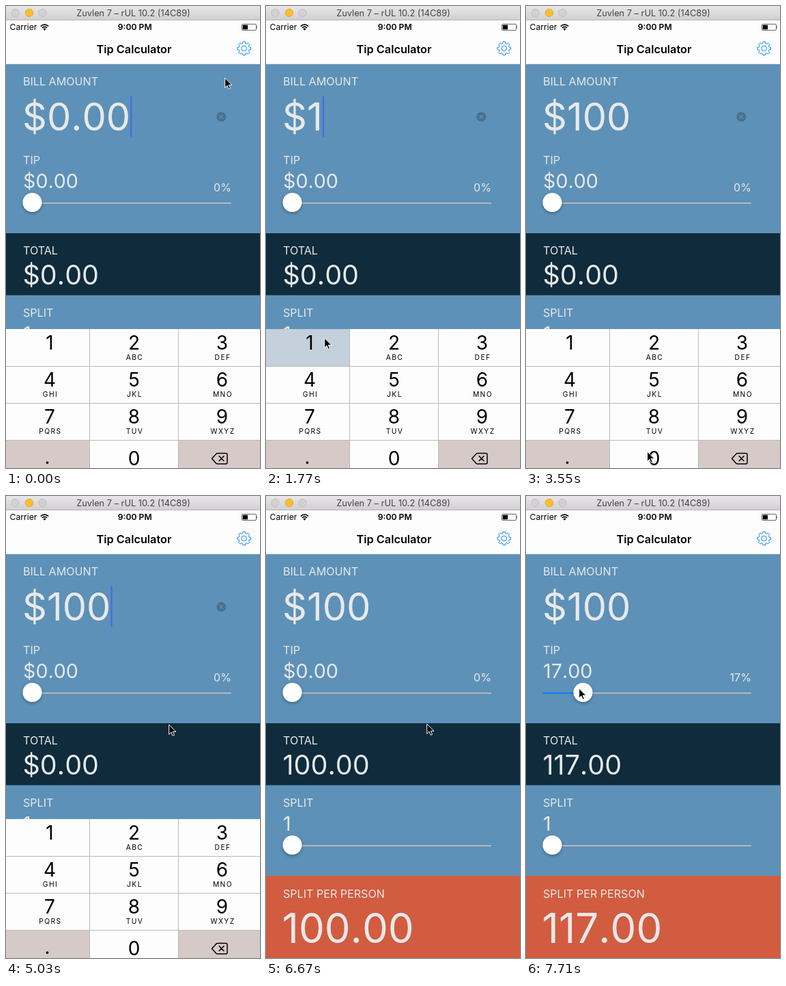
These frames come from a looping animation (372x675 px, 8000 ms). An HTML page:

```html
<!DOCTYPE html>
<html lang="en">
<head>
<meta charset="utf-8">
<title>Tip Calculator</title>
<style>
html, body { margin: 0; width: 100%; height: 100%; overflow: hidden; background: #fdfdfd; }
svg { display: block; width: 372px; height: 675px; font-family: Inter, Roboto, sans-serif; }
.mid { text-anchor: middle; }
.form text { fill: #e8e9ea; font-kerning: none; }
.form .label text { font-size: 16.1px; font-kerning: auto; }
.small { font-size: 28.7px; }
.total { font-size: 39.5px; }
.bill { font-size: 56px; }
.share { font-size: 60px; }
.digit { font-size: 28px; }
.letters { font-size: 10.3px; letter-spacing: 1.4px; }
.thumb { fill: #fff; filter: drop-shadow(0 2px 2px rgba(0, 0, 0, .3)); }
</style>
</head>
<body>
<svg viewBox="0 0 372 675">
  <defs>
    <linearGradient id="chrome" x2="0" y2="1">
      <stop stop-color="#e8e6e8"/><stop offset="1" stop-color="#d1cfd1"/>
    </linearGradient>
  </defs>

  <rect width="372" height="675" fill="#fdfdfd"/>
  <rect width="372" height="20.5" fill="url(#chrome)"/>
  <path d="M0 20.5H372" stroke="#b9b7b9"/>
  <g stroke-width=".8">
    <circle cx="13.5" cy="10" r="5.7" fill="#d2d0d2" stroke="#bcbabc"/>
    <circle cx="34" cy="10" r="5.7" fill="#fdbe2e" stroke="#dfa023"/>
    <circle cx="53.5" cy="10" r="5.7" fill="#d2d0d2" stroke="#bcbabc"/>
  </g>
  <text class="mid" x="186.5" y="15" font-size="12.8" fill="#444">Zuvlen 7 – rUL 10.2 (14C89)</text>

  <text x="5.5" y="35" font-size="12.2">Carrier</text>
  <path d="M50.8 29.6Q56.5 24.6 62.2 29.6M52.9 31.9Q56.5 28.8 60.1 31.9" fill="none" stroke="#000" stroke-width="1.7"/>
  <path d="M54.3 33.3Q56.5 31.6 58.7 33.3L56.5 35.8z"/>
  <text class="mid" x="188.7" y="35" font-size="12.2" font-weight="600">9:00 PM</text>
  <rect x="345.5" y="26.5" width="21" height="9" rx="1.5" fill="none" stroke="#555" stroke-width=".9"/>
  <path d="M346.7 27.7h7.3v6.6h-7.3zM367.4 29.4q1.6 1.6 0 3.2z"/>

  <text class="mid" x="187.5" y="69" font-size="16.3" font-weight="600">Tip Calculator</text>
  <g transform="translate(348.7 62)" fill="none" stroke="#1583f2">
    <path id="gear" stroke-linejoin="round"/><circle r="3.8"/>
  </g>

  <g class="form">
    <rect y="85" width="372" height="471" fill="#5d91b8"/>
    <path d="M0 85.3H372" stroke="#7f99aa" stroke-width=".8"/>
    <rect y="332" width="372" height="90.5" fill="#102b3b"/>
    <rect y="555" width="372" height="120" fill="#d25c3f"/>
    <g class="label">
      <text x="25" y="116">BILL AMOUNT</text>
      <text x="25" y="230.5">TIP</text>
      <text x="25" y="363">TOTAL</text>
      <text x="25" y="453.5">SPLIT</text>
      <text x="25" y="586.5">SPLIT PER PERSON</text>
      <text id="percent" x="330" y="270.7" text-anchor="end"></text>
    </g>
    <text id="bill" class="bill" x="24" y="182"></text>
    <text id="tip" class="small" x="25" y="266"></text>
    <text id="total" class="total" x="24.5" y="407"></text>
    <text class="small" x="25" y="489">1</text>
    <text id="share" class="share" x="23.5" y="653"></text>
    <path d="M25 288H330M25 511H330" stroke="#b5b7b9" stroke-width="2"/>
    <path id="filled" stroke="#0b7bff" stroke-width="2"/>
    <circle id="thumb" class="thumb" cy="287" r="14"/>
    <circle class="thumb" cx="38.5" cy="510" r="14"/>
  </g>

  <g id="editing">
    <circle cx="315.3" cy="162" r="7" fill="#48718f"/>
    <path d="M312.7 159.4l5.2 5.2m0-5.2l-5.2 5.2" stroke="#6796b8" stroke-width="1.1"/>
    <rect id="caret" y="132" width="2.3" height="59.3" fill="#466ce6"/>
    <rect y="472" width="372" height="203" fill="#fdfdfd"/>
    <path d="M0 635H122V675H0zM253 635H372V675H253z" fill="#d6cac9"/>
    <rect id="key1" y="472" width="122" height="54" fill="#c4d0dc"/>
    <rect id="key0" x="123" y="635" width="129" height="40" fill="#d6cac9"/>
    <path d="M0 526.5H372M0 580.5H372M0 634.5H372M122.5 472V675M252.5 472V675" stroke="#b4b2b2" stroke-width=".9"/>
    <g id="keys" class="mid"></g>
    <path d="M301.5 661.3L308 654.2Q308.6 653.6 309.5 653.6H322Q324 653.6 324 655.6V667Q324 669 322 669H309.5Q308.6 669 308 668.4zM311.8 657.3l7.6 7.8m0-7.8l-7.6 7.8"
      fill="none" stroke="#000" stroke-width="1.5" stroke-linejoin="round"/>
  </g>

  <path id="pointer" d="M.7 1.2V15.4L4 12.2L6.2 17.3L8.5 16.3L6.3 11.4H11z" stroke="#fff"/>
</svg>

<script>
const $ = id => document.getElementById(id);
const set = (id, attrs) => {
  for (const name in attrs) $(id).setAttribute(name, attrs[name]);
};
const show = (id, visible) => set(id, { display: visible ? 'inline' : 'none' });

const LOOP = 8000, STEP = LOOP / 54;
const KEYBOARD_CLOSES = 5470;
const TYPE_DELAY = 140;
const DRAG_STARTS = 7255, GRAB_X = 32, PIXELS_PER_PERCENT = 2.65;

const pointerStart = { x: 320, y: 104 };
const moves = [
  { from: 0, to: 1180, x: 62, y: 424 },
  { from: 1180, to: 1480, x: 85, y: 484 },
  { from: 1920, to: 2370, x: 177, y: 650 },
  { from: 4140, to: 5030, x: 238, y: 333 },
  { from: 6620, to: DRAG_STARTS, x: GRAB_X, y: 280 },
  { from: DRAG_STARTS, to: 7700, x: 77, y: 280 }
];
const taps = [
  { key: '1', down: 1620, up: 1900 },
  { key: '0', down: 2500, up: 2640 },
  { key: '0', down: 2650, up: 2790 }
];

function pointerAt(t) {
  let { x, y } = pointerStart;
  for (const move of moves) {
    const p = Math.min(1, Math.max(0, (t - move.from) / (move.to - move.from)));
    const eased = p * p * (3 - 2 * p);
    x += (move.x - x) * eased;
    y += (move.y - y) * eased;
  }
  return { x, y };
}

function buildKeys() {
  const letters = ['', 'ABC', 'DEF', 'GHI', 'JKL', 'MNO', 'PQRS', 'TUV', 'WXYZ'];
  const columns = [64, 187.5, 316.5];
  const digit = (x, y, text) => `<text class="digit" x="${x}" y="${y}">${text}</text>`;
  $('keys').innerHTML = letters.map((word, i) => {
    const x = columns[i % 3], y = 502 + 54 * Math.floor(i / 3);
    return digit(x, y, i + 1) + `<text class="letters" x="${x + 1}" y="${y + 15}">${word}</text>`;
  }).join('') + digit(60.5, 669, '.') + digit(187.5, 671, '0');
}

function buildGear() {
  const corners = Array.from({ length: 32 }, (_, i) => {
    const outer = i % 4 === 1 || i % 4 === 2;
    const side = i % 4 < 2 ? -1 : 1;
    const angle = Math.floor(i / 4) * Math.PI / 4 + side * (outer ? .17 : .27);
    const r = outer ? 9.9 : 7.6;
    return `${r * Math.cos(angle)} ${r * Math.sin(angle)}`;
  });
  set('gear', { d: `M${corners.join('L')}z` });
}

function drawEditing(t) {
  const typed = taps.filter(tap => t >= tap.down + TYPE_DELAY);
  $('bill').textContent = '$' + (typed.map(tap => tap.key).join('') || '0.00');

  // The caret stays solid for a moment after each typed digit, then blinks.
  const justTyped = typed.length && t - typed.at(-1).down - TYPE_DELAY < 700;
  const blinkedOff = t % 1000 >= 500 && t % 1000 < 800;
  show('caret', justTyped || !blinkedOff);
  set('caret', { x: 24 + $('bill').getComputedTextLength() });

  const pressed = taps.find(tap => t >= tap.down && t < tap.up);
  for (const key of ['0', '1']) show('key' + key, pressed && pressed.key === key);
  show('editing', t < KEYBOARD_CLOSES);
}

function draw(t) {
  const { x, y } = pointerAt(t);
  const drag = t > DRAG_STARTS ? x - GRAB_X : 0;
  const tip = Math.round(drag / PIXELS_PER_PERCENT);
  const thumbX = 38.5 + drag;

  drawEditing(t);
  $('tip').textContent = tip ? tip.toFixed(2) : '$0.00';
  $('percent').textContent = tip + '%';
  $('total').textContent = $('share').textContent =
    t < KEYBOARD_CLOSES ? '$0.00' : (100 + tip).toFixed(2);

  set('filled', { d: `M25 288H${drag ? thumbX : 25}` });
  set('thumb', { cx: thumbX });
  set('pointer', { transform: `translate(${Math.round(x)} ${Math.round(y)})` });
}

function tick() {
  const t = performance.now() % LOOP;
  draw(Math.floor((t + 10) / STEP) * STEP % LOOP);
  requestAnimationFrame(tick);
}

buildKeys();
buildGear();
tick();
</script>
</body>
</html>
```
